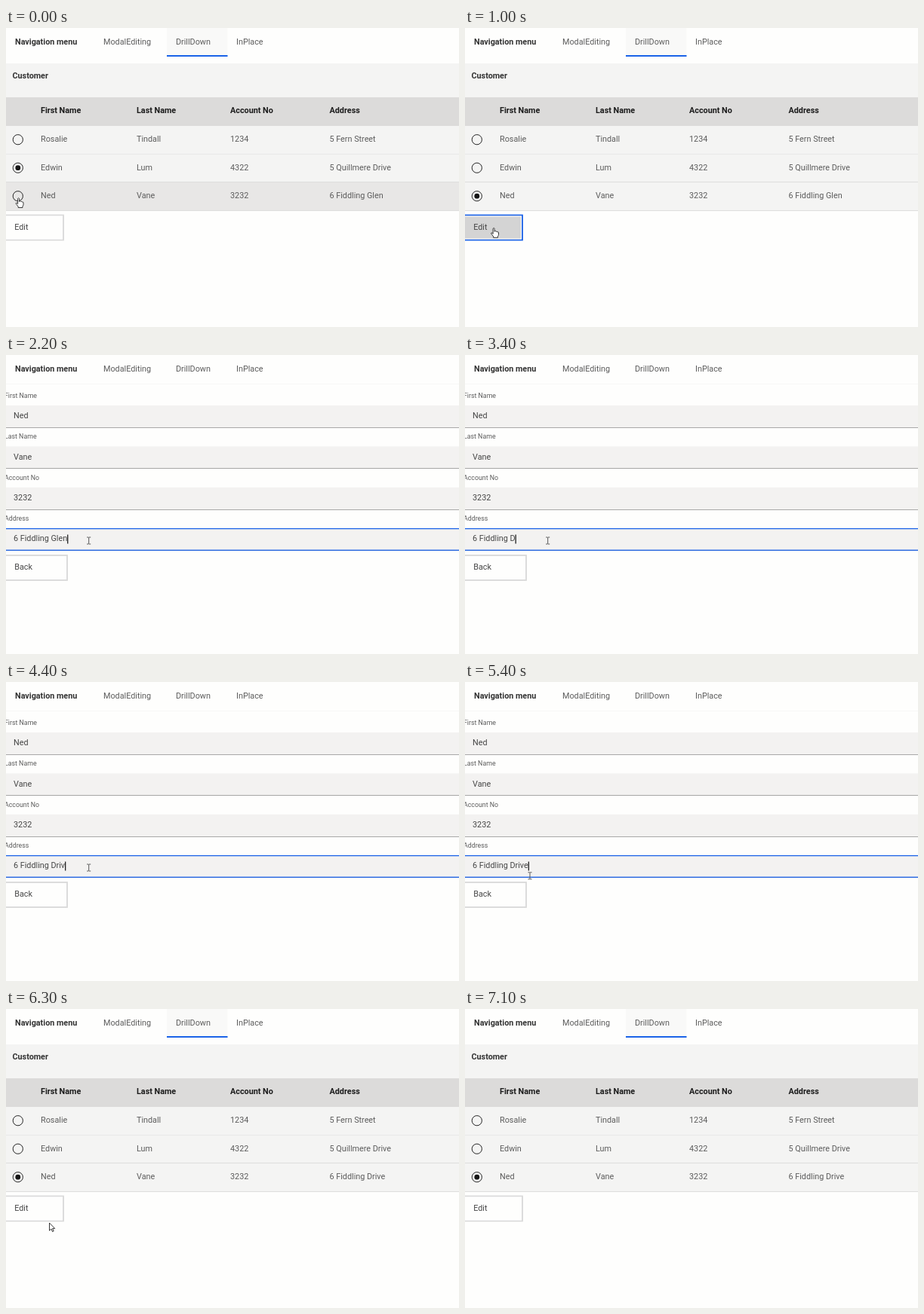
An HTML page that plays this animation: 600 px wide and 397 px high, repeating every 7200 ms.

```html
<!DOCTYPE html>
<html lang="en">
<head>
<meta charset="utf-8">
<style>
  html, body { margin: 0; width: 100%; height: 100%; overflow: hidden; background: #fefefd; }
  svg { display: block; }
  text { font: 10.8px Roboto, "Open Sans", sans-serif; fill: #5c5c5c; white-space: pre; }
  .bold { font-weight: 600; fill: #333; }
  .head { font-weight: 600; fill: #1c1c1c; }
  .label { font-size: 8.8px; }
  .value { fill: #464646; }
</style>
</head>
<body>
<svg id="stage" width="600" height="397" viewBox="0 0 600 397">
  <g id="table"></g>
  <g id="form"></g>
  <g id="nav"></g>
  <g id="cursor" stroke-linejoin="round">
    <path id="arrow" d="M0 0V10.2L2.4 8 4 11.6 5.6 10.9 4.1 7.4H7.2Z" fill="#fff" stroke="#222" stroke-width=".9"/>
    <path id="hand" d="M-.9 1Q.1-.6 1.1 1V5L1.4 4.3Q2.6 3.6 3.1 5Q4.4 4.3 4.9 5.5Q6.3 5 6.5 6.6V9Q6.3 10.6 5.4 11.4V13H-.3V11.6L-3.3 7.8Q-3.6 6.5-2.3 6.6L-.9 8Z" fill="#fff" stroke="#222" stroke-width=".9"/>
    <path id="beam" d="M-2.5-4.5H-.6L0-4 .6-4.5H2.5M0-4V4M-2.5 4.5H-.6L0 4 .6 4.5H2.5" fill="none" stroke="#555"/>
  </g>
</svg>
<script>
const LOOP = 7200, BLUE = "#1a62e8";
const SELECT = 150, EDIT_CLICK = 900, OPEN = 1100, FOCUS = 1750, BACK_CLICK = 6130, CLOSE = 6300;
const STREET = "6 Fiddling ", OLD_END = "Glen", NEW_END = "Drive";
const people = [
  ["Rosalie", "Tindall", "1234", "5 Fern Street"],
  ["Edwin", "Lum", "4322", "5 Quillmere Drive"],
  ["Ned", "Vane", "3232", STREET + OLD_END]
];
const titles = ["First Name", "Last Name", "Account No", "Address"];
const columns = [46, 173, 297, 428.5];
const deletions = [2300, 2450, 2600, 2800];
const insertions = [3050, 3450, 3800, 4250, 4950];
// Pointer hot spot: time, x, y
const path = [
  [0, 16.5, 225.5], [250, 16.5, 225.5], [700, 38, 265.3], [1200, 38, 265.3],
  [1600, 109.7, 246.5], [5000, 109.7, 246.5], [5100, 86, 257.3], [5400, 86, 257.3],
  [5800, 57.5, 284], [6450, 57.5, 284], [6850, -15, 289], [LOOP, -15, 289]
];

const el = id => document.getElementById(id);
const show = (id, on) => el(id).style.display = on ? "" : "none";
const paint = (id, name, value) => el(id).setAttribute(name, value);
const rect = (x, y, w, h, fill, extra = "") =>
  `<rect x="${x}" y="${y}" width="${w}" height="${h}" fill="${fill}" ${extra}/>`;
const text = (x, y, str, cls = "", id = "") =>
  `<text x="${x}" y="${y}" class="${cls}" id="${id}">${str}</text>`;
const button = (id, y, w, label) =>
  rect(-5, y + 1, w + 4, 33, "#fefefd", `id="${id}" stroke="#d9d9d9" stroke-width="1.8"`) +
  rect(-5, y + 2.5, w + 2.5, 30, "none", 'stroke="#fefefd"') +
  text(11.2, y + 20.2, label, "value");

el("nav").innerHTML =
  text(12, 21.8, "Navigation menu", "bold") + text(129, 21.8, "ModalEditing") +
  text(225, 21.8, "DrillDown") + text(305, 21.8, "InPlace");

el("table").innerHTML =
  rect(213, 0, 80.5, 38, "#f9f9f8") + rect(213, 36, 80.5, 2, BLUE) +
  rect(0, 47, 600, 195, "#f4f4f3") + rect(0, 92, 600, 38, "#dcdbda") +
  text(8.5, 66.8, "Customer", "bold") +
  titles.map((title, i) => text(columns[i], 113.3, title, "head")).join("") +
  people.map((person, row) => {
    const y = 130 + row * 37.5;
    return rect(0, y, 600, 37.5, "#f4f4f3", `id="row${row}"`) +
      rect(0, Math.round(y + 36.6), 600, 1, "#dededd") +
      `<circle cx="15.8" cy="${y + 18.2}" r="6.6" fill="none" stroke="#222"/>` +
      `<circle id="dot${row}" cx="15.8" cy="${y + 18.2}" r="3.4" fill="#161616"/>` +
      person.map((str, i) => text(columns[i], y + 21.2, str, "", `cell${row}${i}`)).join("");
  }).join("") +
  button("edit", 247.5, 77, "Edit");

el("form").innerHTML =
  rect(0, 38, 600, 1, "#f8f8f7") +
  titles.map((title, i) => {
    const y = 67 + i * 54.4;
    return text(-2, y - 10, title, "label") + rect(0, y, 600, 30, "#f3f2f1") +
      rect(0, Math.round(y + 29), 600, 1, "#a8a8a8") +
      text(10, y + 17.1, people[2][i], "value", "value" + i);
  }).join("") +
  rect(-4, 230.6, 608, 28.6, "none", `id="focus" stroke="${BLUE}" stroke-width="1.3"`) +
  rect(0, 238.5, 1.2, 12, "#111", 'id="caret"') +
  button("back", 265, 82, "Back");

function pointer(t) {
  const i = path.findIndex(p => p[0] > t);
  const [t0, x0, y0] = path[i - 1], [t1, x1, y1] = path[i];
  const u = (t - t0) / (t1 - t0), e = u * u * (3 - 2 * u);
  return [x0 + (x1 - x0) * e, y0 + (y1 - y0) * e];
}

function address(t) {
  const removed = deletions.filter(d => d <= t).length;
  const typed = insertions.filter(d => d <= t).length;
  return STREET + OLD_END.slice(0, OLD_END.length - removed) + NEW_END.slice(0, typed);
}

function render(t) {
  const [x, y] = pointer(t);
  const inForm = t >= OPEN && t < CLOSE;
  const street = address(t);
  show("table", !inForm);
  show("form", inForm);

  const overRow = !inForm && x > 0 && y > 205 && y < 242;
  const overEdit = !inForm && x > 0 && y > 248 && y < 283;
  const overBack = inForm && x < 81 && y > 265 && y < 299;
  const overField = inForm && y > 230 && y < 260;

  paint("row2", "fill", overRow ? "#e8e7e6" : "#f4f4f3");
  show("dot0", false);
  show("dot1", t < SELECT);
  show("dot2", t >= SELECT);
  el("cell23").textContent = el("value3").textContent = street;

  paint("edit", "fill", overEdit ? "#d4d4d4" : "#fefefd");
  paint("edit", "stroke", t >= EDIT_CLICK && t < OPEN ? BLUE : "#d9d9d9");
  paint("back", "fill", overBack ? "#d4d4d4" : "#fefefd");
  paint("back", "stroke", t >= BACK_CLICK ? BLUE : "#d9d9d9");

  const focus = t < FOCUS ? 0 : Math.max(0, Math.min(1, 1 - (t - BACK_CLICK) / 90));
  paint("focus", "opacity", focus);
  const lastKey = Math.max(FOCUS, ...deletions.concat(insertions).filter(d => d <= t));
  show("caret", focus === 1 && (t - lastKey) % 1000 < 500);
  if (inForm) paint("caret", "x", 10 + el("value3").getComputedTextLength());

  const overRadio = overRow && x < 26;
  const hand = overRadio || overEdit || (overBack && t < BACK_CLICK);
  show("hand", hand);
  show("beam", overField);
  show("arrow", !hand && !overField);
  paint("cursor", "transform", `translate(${x} ${y})`);
}

const start = performance.now();
function tick() {
  render((performance.now() - start) % LOOP);
  requestAnimationFrame(tick);
}
tick();
</script>
</body>
</html>
```
